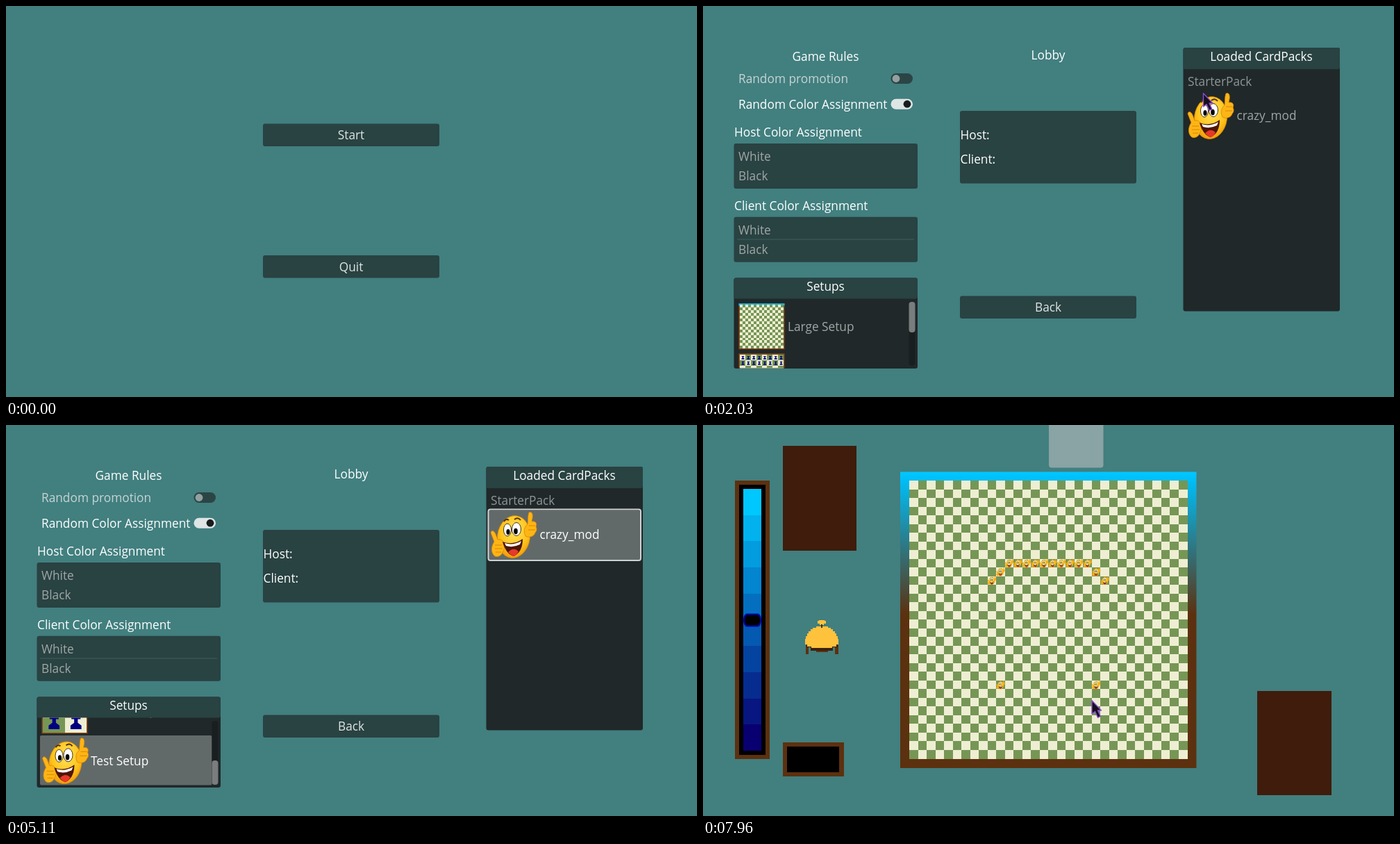
These frames come from a looping animation (995x563 px, 8 s). An HTML page:

```html
<!DOCTYPE html>
<html lang="en">
<head>
<meta charset="utf-8">
<title>Game lobby</title>
<style>
  html, body { margin: 0; width: 100%; height: 100%; overflow: hidden; background: #427f7f; }
  svg { display: block; width: 100%; height: 100%; }
  text { font: 17.27px "Open Sans", "Noto Sans", sans-serif; fill: #fff; white-space: pre; }
  .crisp { shape-rendering: crispEdges; }
</style>
</head>
<body>
<svg id="stage" viewBox="0 0 995 563" xmlns="http://www.w3.org/2000/svg"></svg>
<script>
const LOOP = 8000;
const TEAL = '#427f7f', PANEL = '#294242', HOVER = '#3f5656', BODY = '#202829';
const BROWN = '#5c310f', DARK_BROWN = '#3f1c0c', LIGHT = '#eeeed2', GREEN = '#769656';
const DIM = '#a0a6a6', NAVY = '#000080';

// Markup helpers
const rect = (x, y, w, h, fill, extra = '') =>
  `<rect x="${x}" y="${y}" width="${w}" height="${h}" fill="${fill}" ${extra}/>`;
const box = (x, y, w, h, fill, extra = '') => rect(x, y, w, h, fill, `rx="3" ${extra}`);
const label = (x, y, str, fill = '#fff', extra = '') =>
  `<text x="${x}" y="${y}" fill="${fill}" style="fill:${fill}" ${extra}>${str}</text>`;
const centered = (x, y, str, fill) => label(x, y, str, fill, 'text-anchor="middle"');
const group = (id, body, extra = '') => `<g id="${id}" ${extra}>${body}</g>`;
const use = (id, x, y, scale = 1) =>
  `<use href="#${id}" transform="translate(${x} ${y}) scale(${scale})"/>`;
const button = (id, y, str) =>
  group(id, box(370, y, 254, 32.5, PANEL) + centered(497, y + 22.7, str, '#e0e4e4'));
const field = (y, str) =>
  box(370, y, 254, 41, '#182829') + box(370, y, 254, 39, PANEL) +
  label(374.5, y + 25, str, '#93a0a0');

function checker(x, y, n, size) {
  let d = '';
  for (let row = 0; row < n; row++)
    for (let col = 0; col < n; col++)
      if ((row + col) % 2) d += `M${x + col * size} ${y + row * size}h${size}v${size}h${-size}z`;
  return rect(x, y, n * size, n * size, LIGHT, 'class="crisp"') +
    `<path class="crisp" fill="${GREEN}" d="${d}"/>`;
}

function pieces(n, size, rows) {
  let out = '';
  for (const row of rows)
    for (let col = 0; col < n; col++)
      out += use('pawn', 2 + (col + .5) * size, 2 + (row + .5) * size, size / 24);
  return out;
}

const icon = (id, n, rows, top) => group(id,
  rect(0, 0, 66, 66, '#8a4a18') + (top ? rect(0, 0, 66, 3, '#00bff3') : '') +
  checker(1.5, 2, n, 63 / n) + pieces(n, 63 / n, rows));

const hand = `<path d="M51 35C48 28 49 22 54 18C55 12 54 6 56 1C60-1 62 3 61 9L60 14
  C66 13 68 17 66 21C68 25 67 28 65 30C64 35 57 38 51 35Z"/>`;
const emoji = group('emoji', `
  <g fill="#fdb515" stroke="#d98608" stroke-width=".8">
    <ellipse cx="34" cy="36" rx="23.5" ry="30.5" transform="rotate(8 34 36)" fill="url(#face)"/>
    ${hand}
    <path d="M1 30C2 26 6 27 8 32L11 40C17 39 20 43 19 47C22 51 20 56 18 58C17 64 8 67 5 62
      C1 57 2 49 6 43Z"/>
  </g>
  <path d="M7 48H17M7 53H18M8 58H16M56 20H65M55 26H65" stroke="#d98608" stroke-width="1" fill="none"/>
  <path d="M20 14Q23 9 27 12M35 11Q40 7 44 12" stroke="#5a3008" stroke-width="2" fill="none"/>
  <g fill="#fff" stroke="#46320f" stroke-width="1">
    <ellipse cx="25" cy="26" rx="5.5" ry="9"/><ellipse cx="38" cy="25" rx="6.5" ry="9.5"/>
  </g>
  <ellipse cx="26" cy="29" rx="2.6" ry="4"/><ellipse cx="37" cy="28" rx="2.8" ry="4.2"/>
  <path d="M18 43Q33 49 47 39Q47 58 34 64Q23 61 18 43Z" fill="#4e1606"/>
  <path d="M21 45Q33 49 45 42L43 47Q33 52 23 49Z" fill="#fff"/>
  <path d="M26 58Q34 50 41 57Q38 63 34 64Q29 62 26 58Z" fill="#e8382c"/>`);

const defs = `<defs>
  <radialGradient id="face" cx=".5" cy=".35" r=".7">
    <stop offset="0" stop-color="#ffe25a"/><stop offset=".6" stop-color="#fdc41c"/>
    <stop offset="1" stop-color="#ee9408"/>
  </radialGradient>
  <linearGradient id="rim" x1="0" y1="0" x2="0" y2="1">
    <stop offset="0" stop-color="#00c8ff"/><stop offset=".03" stop-color="#00bdf5"/>
    <stop offset=".48" stop-color="${BROWN}"/>
  </linearGradient>
  <clipPath id="listClip"><rect x="45" y="421.5" width="264" height="100"/></clipPath>
  <path id="pawn" fill="${NAVY}" d="M-5-7H5V-3H2V1L6 4V8H-6V4L-2 1V-3H-5Z"/>
  ${emoji}
  ${icon('largeIcon', 16, [], true)}
  ${icon('classicIcon', 8, [0, 1, 6, 7], false)}
  ${icon('smallIcon', 2, [0, 1], false)}
</defs>`;

const menuScene = group('menu', button('start', 169.5, 'Start') + button('quit', 359, 'Quit'));

const hostScene = group('hostMenu',
  button('host', 17.5, 'Host') + field(92, 'Name') + button('join', 175.5, 'Join') +
  field(250, 'IP address') + button('hostBack', 511.5, 'Back'));

const toggle = (y, on) =>
  rect(270.5, y, 31.5, 15, on ? '#dde5e5' : '#2b4545', 'rx="7.5"') +
  `<circle cx="${on ? 294 : 278}" cy="${y + 7.5}" r="5.4" fill="${on ? '#191c1c' : '#93a0a0'}"/>`;

const colorList = (y, title) =>
  label(45, y - 10, title) + box(44.5, y, 264.5, 65, PANEL) +
  label(51, y + 25, 'White', DIM) + label(51, y + 53, 'Black', DIM);

const setupRow = (i, id, name) => {
  const y = 428 + i * 72;
  return rect(49, y - 3, 247.5, 71.5, '#2d3436', `id="row${i}" rx="2"`) +
    use(id, 51.5, y + .3) + label(122, y + 39.5, name, DIM, `id="rowText${i}"`);
};

const lobbyScene = group('lobby',
  centered(176.5, 78.5, 'Game Rules') +
  label(51, 111, 'Random promotion', '#c6d4d4') + toggle(97, false) +
  label(51, 147.8, 'Random Color Assignment') + toggle(133.7, true) +
  colorList(198, 'Host Color Assignment') + colorList(303.7, 'Client Color Assignment') +
  rect(49, 335.5, 255, 1, '#41605d') +
  box(44.5, 391.5, 264.5, 130.5, BODY) + box(44.5, 391.5, 264.5, 30, PANEL) +
  centered(176.5, 410.3, 'Setups') +
  `<g clip-path="url(#listClip)">` + group('rows',
    setupRow(0, 'largeIcon', 'Large Setup') + setupRow(1, 'classicIcon', 'Classic Setup') +
    setupRow(2, 'smallIcon', 'Small Setup') + setupRow(3, 'emoji', 'Test Setup')) + '</g>' +
  rect(296.5, 426, 9, 92, '#191f20', 'rx="4"') +
  rect(296.5, 426, 9, 44, '#7a7d7d', 'id="thumb" rx="4"') +
  group('lobbyTitle', centered(497, 76.5, 'Lobby')) +
  group('players', box(370, 151, 254, 104.5, PANEL) +
    label(370.5, 192.3, 'Host:') + label(370.5, 227.3, 'Client:')) +
  button('play', 417.5, 'Start') + button('lobbyBack', 417.5, 'Back') +
  box(691.5, 60, 225.5, 379.5, BODY) + box(691.5, 60, 225.5, 31, PANEL) +
  centered(804, 78.5, 'Loaded CardPacks') + label(698, 115.3, 'StarterPack', '#8f9595') +
  rect(695, 123, 218, 71, '#626a69', 'id="pack" rx="2"') +
  rect(694.5, 121.5, 219.5, 73.5, 'none', 'id="packFocus" rx="3" stroke="#cfd2d2" stroke-width="2"') +
  use('emoji', 697, 125) + label(768.5, 164.3, 'crazy_mod', DIM, 'id="packText"'));

const mix = (a, b, k) => a + (b - a) * k;
const bands = Array.from({ length: 10 }, (_, i) => {
  const k = i / 9;
  const rgb = [mix(0, 8, k), mix(200, 0, k), mix(255, 112, k)].map(Math.round);
  return rect(58, 92 + i * 37.7, 26, 38, `rgb(${rgb})`);
}).join('');

const CELL = 400.5 / 32;
const smiley = (col, row) => use('emoji', 297 + col * CELL, 80 + row * CELL, CELL / 67);
const arc = Array.from({ length: 14 }, (_, i) => {
  const col = 9 + i;
  return smiley(col, Math.max(9, 20 - col, col - 11));
}).join('');

const bell = `<g class="crisp">
  <path fill="${BROWN}" d="M148 317h4v13h-4zM190 317h5v13h-5zM163 322h17v5h-17z"/>
  <path fill="#3c210c" d="M149 316H194V320H187V325H155V320H149Z"/>
  <path fill="#ffc23c" d="M167 281H175V282H177V286H174V288H168V286H165V282H167Z
    M163 290H180V292H184V294H187V297H190V300H192V304H194V308H195V316H192V319H186V321H156V319H150
    V316H147V308H148V304H150V300H152V297H155V294H158V292H163Z"/>
  <path fill="#4a2a0c" d="M170 287h2v5h-2z"/>
</g>`;

const gameScene = group('game', `<g class="crisp">` +
  rect(46, 80, 50, 401, BROWN) + rect(52, 86, 38, 389, '#000') +
  group('duel', rect(58, 92, 26, 189, '#c80000') + rect(58, 281, 26, 188, '#34679a')) +
  group('bands', bands) +
  rect(115, 30, 106, 150.5, DARK_BROWN) + rect(798, 383, 106.5, 150, DARK_BROWN) +
  rect(115, 457, 88, 49, BROWN) + rect(121, 463, 75, 37, '#000') + '</g>' +
  `<path fill="#000" stroke="#0000b4" stroke-width="2"
    d="M63 272.5H79Q83 274 83 281Q83 288 79 289.5H63Q59 288 59 281Q59 274 63 272.5Z"/>` + bell +
  group('waiting', rect(485, 268.5, 75, 75, BROWN) +
    '<path fill="#162a2c" d="M779 118H897V321.500H771V314H763.500V133.500H771V125.500H779Z"/>', 'class="crisp"') +
  group('board', rect(284, 67.5, 426.5, 426.5, 'url(#rim)') + checker(297, 80, 32, CELL) +
    arc + smiley(10, 23) + smiley(21, 23) + rect(498, -20, 78.5, 81.5, '#8aa3a5', 'rx="4"')));

const cursorShape = `<path id="cursor" fill="#15101c" stroke="#8b4bd6" stroke-width="1.4"
  stroke-linejoin="round" d="M.5 .7V20L5 16.500L9 25.300L12.800 23.300L9 15H14Z"/>`;

document.getElementById('stage').innerHTML =
  defs + rect(0, 0, 995, 563, TEAL) + menuScene + hostScene + lobbyScene + gameScene + cursorShape;

// Timeline
const $ = id => document.getElementById(id);
const show = (id, on) => { $(id).style.display = on ? '' : 'none'; };
const move = (id, x, y) => $(id).setAttribute('transform', `translate(${x} ${y})`);
const ease = k => k * k * (3 - 2 * k);

// [time, x, y] of the pointer tip
const PATH = [
  [40, 919, 535], [420, 562, 188], [620, 572.5, 181], [820, 570, 184], [870, 570, 184],
  [1340, 556, 39], [1740, 556, 39], [2030, 720, 125], [2250, 738, 158], [2560, 738, 158],
  [2900, 258, 497], [3110, 293, 460], [3350, 301, 452], [3400, 301, 452], [3940, 297, 509],
  [4160, 297, 509], [4440, 150, 498], [4980, 150, 498], [5110, -20, 490],
  [6120, 570, 495], [6560, 485, 420], [7040, 485, 420], [7090, 484, 421], [7340, 484, 421],
  [7420, 491, 419], [7760, 491, 419], [7960, 559.5, 396]
];

function pointer(t) {
  if (t < 40 || (t >= 5110 && t < 6120)) return null;
  const i = PATH.findIndex(p => p[0] > t);
  if (i < 0) return PATH[PATH.length - 1].slice(1);
  const [t0, x0, y0] = PATH[i - 1], [t1, x1, y1] = PATH[i];
  const k = ease((t - t0) / (t1 - t0));
  return [mix(x0, x1, k), mix(y0, y1, k)];
}

const BUTTONS = ['start', 'quit', 'host', 'join', 'hostBack', 'play', 'lobbyBack'];

function render(t) {
  const tip = pointer(t);
  const over = (x, y, w, h) =>
    !!tip && tip[0] >= x && tip[0] <= x + w && tip[1] >= y && tip[1] <= y + h;

  show('menu', t < 560);
  show('hostMenu', t >= 560 && t < 1440);
  show('lobby', t >= 1440 && t < 6820);
  show('game', t >= 6820);
  show('cursor', tip);
  if (tip) move('cursor', ...tip);

  const joined = t >= 5950;
  show('play', joined);
  move('lobbyTitle', 0, joined ? -9 : 0);
  move('players', 0, joined ? -24 : 0);
  move('lobbyBack', 0, joined ? 64 : 0);

  for (const id of BUTTONS) {
    const shape = $(id).firstChild;
    const shift = id === 'lobbyBack' && joined ? 64 : 0;
    const hot = over(370, +shape.getAttribute('y') + shift, 254, 32.5);
    shape.setAttribute('fill', hot ? HOVER : PANEL);
    $(id).lastChild.style.fill = hot ? '#fff' : '#e0e4e4';
  }

  const packOn = t >= 2330, packHot = over(695, 126, 218, 68);
  show('pack', packOn || packHot);
  $('pack').setAttribute('fill', packOn ? (packHot ? '#727979' : '#626a69') : '#2d3436');
  $('packText').style.fill = packOn || packHot ? '#fff' : DIM;
  show('packFocus', t >= 4700);

  const drag = ease(Math.min(1, Math.max(0, (t - 3400) / 540)));
  const scroll = 194 * drag;
  move('rows', 0, -scroll);
  $('thumb').setAttribute('height', packOn ? 35 : 44);
  $('thumb').setAttribute('y', 426 + 57 * drag);
  $('thumb').setAttribute('fill', t >= 3400 && t < 3960 ? '#a4a8a8' : '#7a7d7d');

  for (let i = 0; i < 4; i++) {
    const top = 425 + i * 72 - scroll;
    const hot = over(49, Math.max(422, top), 247, Math.min(521, top + 71) - Math.max(422, top));
    const on = i === 3 && t >= 4660;
    show('row' + i, hot || on);
    $('row' + i).setAttribute('fill', on ? (hot ? '#727979' : '#626a69') : '#2d3436');
    $('rowText' + i).style.fill = on ? '#fff' : hot ? '#e6e8e8' : DIM;
  }

  const playing = t >= 7770;
  show('duel', !playing);
  show('waiting', !playing);
  show('bands', playing);
  show('board', playing);
}

const began = performance.now();
function tick() {
  render((performance.now() - began) % LOOP);
  requestAnimationFrame(tick);
}
tick();
</script>
</body>
</html>
```
